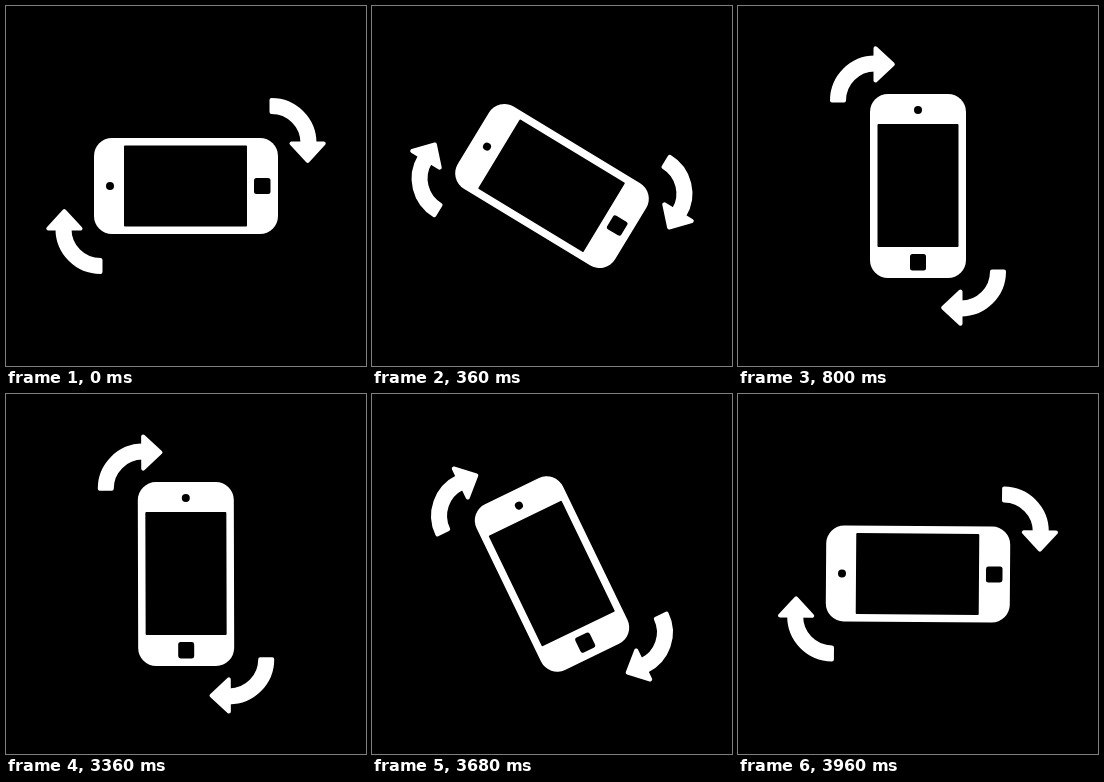
An HTML page with a canvas that plays this animation: 360 by 360 pixels, repeating every 4 s.

```html
<!DOCTYPE html>
<html lang="en">
<head>
<meta charset="utf-8">
<title>Rotating phone</title>
<style>
  html, body { margin: 0; width: 100%; height: 100%; overflow: hidden; background: #000; }
  canvas { display: block; width: 360px; height: 360px; }
</style>
</head>
<body>
<canvas id="stage" width="360" height="360"></canvas>
<script>
const ctx = document.getElementById('stage').getContext('2d');
const LOOP = 4000;
const WHITE = '#fff', BLACK = '#000';

// Cubic Bezier easing with control points (x1, 0) and (x2, 1)
function bezier(x1, x2) {
  const at = (s, a, b) => 3 * (1 - s) ** 2 * s * a + 3 * (1 - s) * s * s * b + s ** 3;
  return x => {
    if (x <= 0) return 0;
    if (x >= 1) return 1;
    let lo = 0, hi = 1;
    for (let i = 0; i < 30; i++) {
      const mid = (lo + hi) / 2;
      if (at(mid, x1, x2) < x) lo = mid; else hi = mid;
    }
    return at(lo, 0, 1);
  };
}

const stand = bezier(0.77, 0.175);
const lie = bezier(0.835, 0.475);

// Angle from upright: -90 is lying down, 0 is standing
function angle(t) {
  const up = stand((t - 8) / 792) - lie((t - 3322) / 678);
  return (up - 1) * Math.PI / 2;
}

function box(x, y, w, h, r, color) {
  ctx.fillStyle = color;
  ctx.beginPath();
  ctx.roundRect(x, y, w, h, r);
  ctx.fill();
}

function phone() {
  box(-48, -92, 96, 184, 18, WHITE);
  box(-40.5, -62, 81, 123, 1, BLACK);
  box(-4, -80, 8, 8, 4, BLACK);
  box(-8, 68, 16, 16.5, 2.5, BLACK);
}

function arrow() {
  ctx.fillStyle = ctx.strokeStyle = WHITE;
  ctx.lineJoin = 'round';
  ctx.lineWidth = 4;

  // Curved shaft
  ctx.beginPath();
  ctx.arc(-43, -85.5, 43, Math.PI, Math.PI * 1.5);
  ctx.arc(-43, -85.5, 31, Math.PI * 1.5, Math.PI, true);
  ctx.closePath();
  ctx.fill();
  ctx.stroke();

  // Head
  ctx.beginPath();
  ctx.moveTo(-42.5, -137.7);
  ctx.lineTo(-25.2, -121.7);
  ctx.lineTo(-42.5, -105.5);
  ctx.closePath();
  ctx.fill();
  ctx.stroke();
}

function draw(t) {
  ctx.setTransform(1, 0, 0, 1, 0, 0);
  ctx.fillStyle = BLACK;
  ctx.fillRect(0, 0, 360, 360);
  ctx.translate(180, 180);
  ctx.rotate(angle(t));
  phone();
  arrow();
  ctx.rotate(Math.PI);
  arrow();
}

const start = performance.now();
function tick() {
  draw((performance.now() - start) % LOOP);
  requestAnimationFrame(tick);
}
tick();
</script>
</body>
</html>
```
